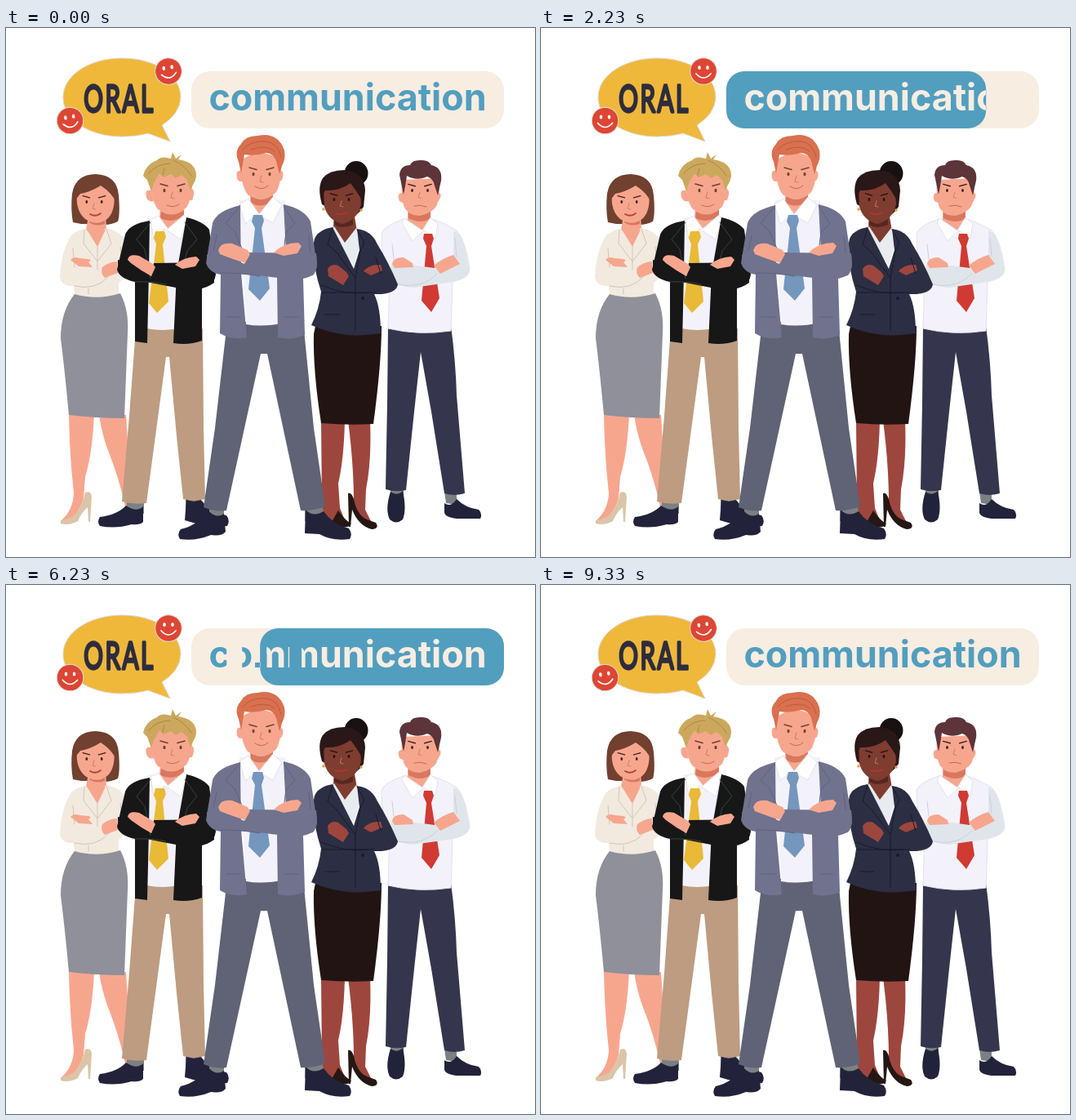
Write an HTML page that moves like this. It is 648 px wide and 648 px high and loops after 9.51 s.

```html
<!DOCTYPE html>
<html lang="en">
<head>
<meta charset="utf-8">
<title>Oral communication</title>
<style>
html, body { margin: 0; width: 100%; height: 100%; overflow: hidden; background: #fff; }
svg { display: block; width: 100vw; height: 100vh; }
.word { font: 700 44.8px Inter, "Open Sans", sans-serif; text-anchor: middle; }
.oral { font: 400 47px Lato, "Open Sans", sans-serif; letter-spacing: 4px; text-anchor: middle;
  fill: #2e2d3f; stroke: #2e2d3f; stroke-width: 2.8; stroke-linejoin: round; vector-effect: non-scaling-stroke; }
.blue { fill: #529ebf; }
.cream { fill: #f7ede1; }
.skin { fill: #f7a68e; }
.sock { fill: #7b8083; }
.shoe { fill: #22233a; }
.shirt { fill: #f3f2fa; }
.line { fill: none; stroke-width: 1; stroke-linecap: round; stroke-linejoin: round; }
.shade { fill: #d9785f; }
</style>
</head>
<body>
<svg viewBox="0 0 648 648">
<defs>
  <g id="smiley">
    <circle r="16.3" fill="#dd4634" stroke="#e3dcd4"/>
    <ellipse cx="-5" cy="-4.5" rx="1.8" ry="2.6" fill="#fff"/>
    <ellipse cx="5" cy="-4.5" rx="1.8" ry="2.6" fill="#fff"/>
    <path d="M-9 3Q0 13 9 3" class="line" stroke="#fff" style="stroke-width:1.7"/>
  </g>
  <g id="look">
    <ellipse cx="-10" rx="1.5" ry="2.2" fill="currentColor"/>
    <ellipse cx="10" rx="1.5" ry="2.2" fill="currentColor"/>
    <path d="M-15-8L-6-5.500M15-8L6-5.500" class="line" stroke="currentColor" style="stroke-width:1.5"/>
    <path d="M0 2L-2 9L2 10" class="line" stroke="#d8775f"/>
  </g>
  <clipPath id="inFill"><rect class="fill" y="53" height="70" rx="22"/></clipPath>
  <mask id="gaps" maskUnits="userSpaceOnUse" x="0" y="0" width="648" height="150">
    <rect width="648" height="150" fill="#fff"/>
    <rect class="gap" y="55"/><rect class="gap" y="55"/><rect class="gap" y="55"/>
  </mask>
</defs>

<!-- woman in the grey skirt -->
<g>
  <path class="skin" d="M77 474H108Q106 520 97 550L95 576Q88 600 70 607L69 602Q82 590 83 570Q78 525 77 474ZM114 474H147L154 586H146Q138 550 126 520Q118 500 114 474Z"/>
  <path fill="#dac5a8" d="M67 603Q82 601 88 592Q95 580 97 569Q104 566 105 574L103 605H101L100 587Q92 594 88 604Q77 610 67 607Z"/>
  <path fill="#71402f" d="M82 238Q79 222 81 203Q85 179 110 179Q136 180 138 205Q140 228 137 237Q125 243 112 240H92Z"/>
  <path class="skin" d="M102 226H122L123 247L112 262L98 247Z"/>
  <path class="shade" d="M102 235Q114 238 121 229V240Q110 244 102 238Z"/>
  <path class="skin" d="M87 203L132 198Q135 223 125 233Q112 244 97 234Q85 224 87 203Z"/>
  <path class="skin" d="M88 206Q96 193 112 191Q126 192 131 204Z"/>
  <path fill="#71402f" d="M84 212Q82 186 104 182Q127 180 135 203V214Q130 202 116 193Q103 201 91 203Z"/>
  <g transform="translate(108 213) scale(.92)" color="#41241f"><use href="#look"/></g>
  <path d="M103 228Q110 232 116 227" class="line" stroke="#b93e36" style="stroke-width:1.8"/>
  <path fill="#f2eadf" d="M98 246L112 265L122 245Q143 249 146 262L153 300L138 312V327Q112 335 84 327L83 316Q67 317 66 304Q68 272 80 254Q88 247 98 246Z"/>
  <path class="skin" d="M99 247L112 268L122 247L112 254Z"/>
  <path d="M96 247L95 264L112 286L129 264L123 246M112 268V296M82 270L84 293M84 316Q110 322 125 305M140 268L142 286M101 326V319" class="line" stroke="#d2c5b5"/>
  <path class="skin" d="M79 284Q83 279 90 282L101 283Q106 284 101 287L106 293L89 292ZM118 293Q127 286 136 286L137 300L121 306Q115 300 118 293Z"/>
  <path fill="#8f9099" d="M84 326Q112 334 140 325Q151 346 149 374L145 478Q110 478 77 474Q72 420 67 380Q67 347 84 326Z"/>
</g>

<!-- man in the white shirt -->
<g>
  <path class="sock" d="M471 564H487V574H471ZM537 568H552V584L539 582Z"/>
  <path class="shoe" d="M471 568Q479 574 486 567Q491 590 486 602Q478 609 470 602Q464 590 471 568ZM537 582Q545 588 552 577Q563 588 579 590Q584 595 581 601H552Q537 599 537 593Z"/>
  <path fill="#35364d" d="M468 365H545Q551 410 552 450L562 570Q549 574 537 570L521 470L508 397L500 470L490 566Q476 569 465 565L467 460Z"/>
  <path class="shirt" stroke="#e1e2ec" d="M487 234Q463 242 460 252Q460 285 470 306L468 368Q505 377 545 371L547 310Q567 306 568 295Q563 260 552 248Q535 238 522 234Z"/>
  <path class="skin" d="M492 219H520V235L508 251L492 238Z"/>
  <path class="shade" d="M493 226Q508 235 520 223V233Q508 241 493 233Z"/>
  <path class="skin" d="M485 186L530 184Q533 214 524 222Q507 236 490 223Q483 214 485 186Z"/>
  <path class="skin" d="M486 202Q478 202 482 212L488 215ZM529 201Q536 203 529 213Z"/>
  <path fill="#5c3439" d="M487 204Q485 194 482 180Q483 168 495 168Q497 161 510 162Q518 162 521 168Q535 171 533 187Q531 195 529 205L525 193Q524 185 516 182Q503 188 491 181Q489 195 487 204Z"/>
  <g transform="translate(507 199) scale(.95)" color="#3b2426"><use href="#look"/></g>
  <path d="M500 218Q508 216 515 219" class="line" stroke="#cb6654"/>
  <path fill="#fff" stroke="#e1e2ec" d="M488 233L485 239L498 261L512 248L526 258L529 240L520 232L510 248Z"/>
  <path fill="#d03a33" d="M512 252H522L524 258L521 267L531 331L521 348L509 334L515 267L511 258Z"/>
  <path fill="#e0e5eb" d="M548 248Q558 251 561 264L568 298Q566 307 548 311L500 318Q477 317 470 305L472 289L503 291L525 294L548 283Z"/>
  <path class="skin" d="M473 289Q474 281 487 281L498 288L499 293L476 294ZM524 291Q534 282 548 278L556 289L532 301Z"/>
  <path d="M473 265L475 283M550 258L552 280M480 314Q510 320 528 301" class="line" stroke="#cbd1d9"/>
</g>

<!-- man in the black jacket -->
<g>
  <path class="sock" d="M148 578H169V595H148ZM220 575H239V592H220Z"/>
  <path class="shoe" d="M147 585Q160 594 168 586V605Q164 609 154 608Q134 614 115 610Q111 605 115 599Q137 596 147 585ZM221 577Q231 583 238 577Q251 594 270 597Q275 603 271 610Q250 613 219 603Z"/>
  <path fill="#bd9c81" d="M159 368H241L242 490L244 577Q230 581 217 577L209 500L200 403L196 403L183 500L172 582Q156 584 142 580L151 475Z"/>
  <path class="shirt" d="M174 232H222L224 365Q198 373 172 368Z"/>
  <path class="skin" d="M189 219H218V231L201 248L188 233Z"/>
  <path class="shade" d="M190 225Q204 233 218 223V230Q203 240 189 233Z"/>
  <path class="skin" d="M176 181H228Q228 210 221 220Q205 233 186 222Q178 213 176 181Z"/>
  <path class="skin" d="M178 176H226V190H178Z"/>
  <path class="skin" d="M178 199Q169 197 172 207Q174 214 181 212ZM226 196Q233 198 228 211H223Z"/>
  <path fill="#cba85d" d="M178 200L173 186L168 181Q171 167 185 162Q190 156 202 160L204 152L208 160L215 155L211 161Q226 163 231 172Q236 182 229 192L226 199L222 186L215 180L208 184L202 179L193 183L188 178L181 190Z"/>
  <path d="M175 178Q185 166 201 166M205 162Q219 168 227 181M194 172L192 180" class="line" stroke="#ad8843"/>
  <g transform="translate(204 199)" color="#68422e"><use href="#look"/></g>
  <path d="M197 217Q205 221 212 216" class="line" stroke="#cb6654"/>
  <path fill="#fff" stroke="#e1e2ec" d="M187 230L177 235L181 259L194 246L214 259L222 234L218 229L198 246Z"/>
  <path fill="#e9ba37" d="M183 249H194L196 256L192 265L199 335L185 349L175 337L184 265L181 257Z"/>
  <path fill="#171718" d="M176 236Q151 240 146 253L136 296Q139 307 158 311L158 384L173 386L175 300ZM221 232Q242 237 249 247L257 302Q255 316 240 319V383Q224 389 205 386L209 300Z"/>
  <path fill="#171718" d="M137 284Q136 302 151 307L208 318Q241 323 255 312L254 287L181 288L178 304L152 287Z"/>
  <path d="M177 238L160 259L170 271L177 307M219 238L234 259L222 273L218 289M158 311Q179 310 196 314" class="line" stroke="#38433f"/>
  <path class="skin" d="M149 284Q150 276 163 279L180 289L183 293L178 304Q165 297 153 288ZM207 290Q217 281 233 280L237 284L232 292L216 295Z"/>
</g>

<!-- woman in the navy suit -->
<g>
  <path fill="#9d463e" d="M386 481H415Q414 528 407 558L409 588L417 608H390L387 580ZM419 481H446Q448 530 441 565L440 590L449 608L434 605L426 580Q426 535 419 481Z"/>
  <path fill="#251714" d="M387 594L399 605L407 591Q416 604 423 607Q421 613 407 611L388 608ZM419 570Q423 568 426 577Q430 597 442 602L453 606Q458 613 448 614Q432 610 424 590L422 611H420Z"/>
  <path fill="#211412" d="M379 365H460Q460 410 450 485Q419 487 386 484Q376 420 377 375Z"/>
  <ellipse cx="429" cy="178" rx="14.5" ry="15" fill="#171112"/>
  <path fill="#2a1717" d="M387 216Q381 195 388 184Q396 174 414 174Q439 176 440 199L438 219Q431 230 419 234Z"/>
  <path fill="#7f3c31" d="M402 225H426L430 249L415 268L401 244Z"/>
  <path fill="#55271f" d="M402 232Q414 240 425 229V241Q411 247 402 241Z"/>
  <path fill="#7f3c31" d="M389 196Q408 194 422 187Q435 196 435 216Q430 236 412 240Q395 236 390 219Z"/>
  <path fill="#2a1717" d="M386 208Q384 183 406 178Q431 176 439 200L435 209Q429 199 422 190Q408 200 391 199Z"/>
  <g transform="translate(411 210) scale(.9)" color="#211211"><use href="#look"/></g>
  <path d="M404 227Q412 230 418 226" class="line" stroke="#a73732" style="stroke-width:2.2"/>
  <g fill="#d6a354"><circle cx="389" cy="222" r="1.8"/><circle cx="435" cy="223" r="1.8"/></g>
  <path fill="#e8ebef" d="M402 243L397 252L426 291L436 256L429 245L415 263Z"/>
  <path fill="#2c2e43" d="M400 244Q378 248 377 263Q375 290 386 323Q384 344 374 364Q412 382 459 374Q459 342 451 326Q478 327 480 314Q468 286 455 265Q448 248 430 246L433 272L426 295Z"/>
  <path fill="#9d463e" d="M394 295Q399 288 407 291L417 299L420 304L413 315L395 304ZM438 298Q445 289 459 290L461 297L447 303Z"/>
  <path d="M400 245L394 265L405 275L428 306M430 247L439 263L434 274L428 306V370M386 315Q417 328 443 324M453 281L459 301M387 324H452M391 351H408" class="line" stroke="#171b2c"/>
  <circle cx="437" cy="331" r="2" fill="#171b2c"/>
</g>

<!-- man in front -->
<g>
  <path class="sock" d="M249 583H267V605H249ZM366 583H388V604H366Z"/>
  <path class="shoe" d="M247 590Q257 602 267 595L269 617Q264 623 251 621Q232 629 213 626Q209 620 214 614Q236 609 247 590ZM367 590Q376 600 389 592Q400 608 420 613Q425 620 421 626Q400 629 384 620L366 619Z"/>
  <path fill="#606275" d="M271 360H364Q370 420 377 490L391 586Q377 592 361 591L320 399H312L270 591Q256 593 242 587L256 490Z"/>
  <path class="shirt" d="M286 211H342V361Q315 367 294 363Z"/>
  <path class="skin" d="M299 199H327V211L311 230L299 216Z"/>
  <path class="shade" d="M300 205Q314 216 327 203V212Q312 222 300 214Z"/>
  <path class="skin" d="M287 163Q312 143 337 163Q338 189 331 201Q315 217 296 204Q287 192 287 163Z"/>
  <path class="skin" d="M288 175Q281 173 283 184Q285 190 291 187ZM335 174Q342 175 338 186L332 190Z"/>
  <path fill="#d9704f" d="M288 178L285 164Q279 151 288 142Q293 132 308 132Q333 127 341 150Q343 160 338 169L335 179L331 163Q327 153 319 153Q304 157 292 155Z"/>
  <path d="M290 149Q301 137 319 139Q333 141 337 158M300 149Q319 142 329 151" class="line" stroke="#bd5a40"/>
  <g transform="translate(313 179)" color="#78422e"><use href="#look"/></g>
  <path d="M305 194Q314 200 321 193" class="line" stroke="#c76352"/>
  <path fill="#fff" stroke="#e1e2ec" d="M297 209L286 216L293 240L307 228L327 239L338 217L327 207L310 228Z"/>
  <path fill="#7596bd" d="M303 229H314L316 236L313 245L323 319L311 334L297 320L305 245L301 237Z"/>
  <path fill="#70728e" d="M287 217Q258 224 253 239L245 288Q249 300 263 302L262 374Q277 383 295 379L288 300ZM340 216Q366 222 373 237L381 291Q379 304 364 307L366 376Q350 383 333 379L332 304L343 275Z"/>
  <path fill="#70728e" d="M246 278Q246 294 260 299L318 304Q355 310 376 303Q383 296 380 276L298 275L292 289L262 276Z"/>
  <path d="M287 218L269 239L280 249L289 270M340 218L354 240L343 250L341 266M263 300Q291 300 311 304M371 255L373 275M258 254L254 273M270 354H287M341 354H358" class="line" stroke="#5f6280"/>
  <path class="skin" d="M260 272Q263 262 277 264L296 272L299 277L293 288Q280 284 262 277ZM328 275Q340 263 358 263L362 267L357 276L340 279Z"/>
</g>

<!-- speech bubble -->
<path fill="#efb83a" stroke="#ddd6cb" d="M142 37C183 37 214 58 214 85Q213 105 191 119L201 139L174 129Q160 133 142 133C102 133 70 112 70 85C70 58 102 37 142 37Z"/>
<text class="oral" transform="translate(139 102.500) scale(.63 1)">ORAL</text>
<g transform="translate(199 53)"><use class="face" href="#smiley"/></g>
<g transform="translate(78.500 113.500)"><use class="face" href="#smiley"/></g>

<!-- word pill -->
<rect class="cream" x="227" y="53" width="383" height="70" rx="23"/>
<g mask="url(#gaps)"><text class="word blue" x="418.500" y="101">communication</text></g>
<rect class="fill blue" y="53" height="70" rx="22" ry="22"/>
<g mask="url(#gaps)"><g clip-path="url(#inFill)"><text class="word cream" x="418.500" y="101" aria-hidden="true">communication</text></g></g>
</svg>

<script>
const LOOP = 9510, LEFT = 227, RIGHT = 610, SWEEP = 1690;
const FILL_AT = 1335, EMPTY_AT = 5950;
// gaps in the lettering around the moving edge: from, to, height
const FILL_GAPS = [[0, 86, 60], [94, 122, 40], [0, 0, 0]];
const EMPTY_GAPS = [[-41, -22, 60], [-8, 8, 40], [36, 51, 60]];
// smiley tilt within a four second cycle: time, degrees
const TILT = [[0, -10], [800, 0], [1330, -9], [1630, -3], [2230, 0], [3100, -20], [3230, -20], [3400, -10], [4000, -10]];

const all = s => [...document.querySelectorAll(s)];
const fills = all('.fill'), gaps = all('.gap'), faces = all('.face');
const clamp = v => Math.min(1, Math.max(0, v));
const set = (el, attrs) => { for (const k in attrs) el.setAttribute(k, attrs[k]); };

// cubic-bezier(.25, .1, .25, 1)
function ease(u) {
  const curve = (s, a, b) => 3 * (1 - s) ** 2 * s * a + 3 * (1 - s) * s * s * b + s ** 3;
  let lo = 0, hi = 1;
  for (let i = 0; i < 24; i++) {
    const mid = (lo + hi) / 2;
    if (curve(mid, .25, .25) < u) lo = mid; else hi = mid;
  }
  return curve(hi, .1, 1);
}

function tiltAt(t) {
  const i = TILT.findIndex(k => k[0] > t);
  const [t0, a] = TILT[i - 1], [t1, b] = TILT[i];
  const u = (t - t0) / (t1 - t0);
  return a + (b - a) * u * u * (3 - 2 * u);
}

function drawPill(t) {
  const emptying = t >= EMPTY_AT;
  const u = clamp((t - (emptying ? EMPTY_AT : FILL_AT)) / SWEEP);
  const edge = u === 0 ? LEFT : u === 1 ? RIGHT : LEFT + (RIGHT - LEFT) * ease(u);
  const x = emptying ? edge : LEFT;
  const width = emptying ? RIGHT - edge : edge - LEFT;
  fills.forEach(el => set(el, { x, width, rx: Math.min(22, width / 2), ry: 22 }));

  const reach = Math.min(1, u / .16) * Math.min(1, ((1 - u) / .835) ** .6);
  (emptying ? EMPTY_GAPS : FILL_GAPS).forEach(([from, to, height], i) =>
    set(gaps[i], { x: edge + from * reach, width: (to - from) * reach, height }));
}

function frame(now) {
  const t = now % LOOP;
  drawPill(t);
  const tilt = tiltAt(Math.min(t, 9330) % 4000);
  faces.forEach(el => set(el, { transform: `rotate(${tilt})` }));
  requestAnimationFrame(frame);
}
frame(0);
</script>
</body>
</html>
```
